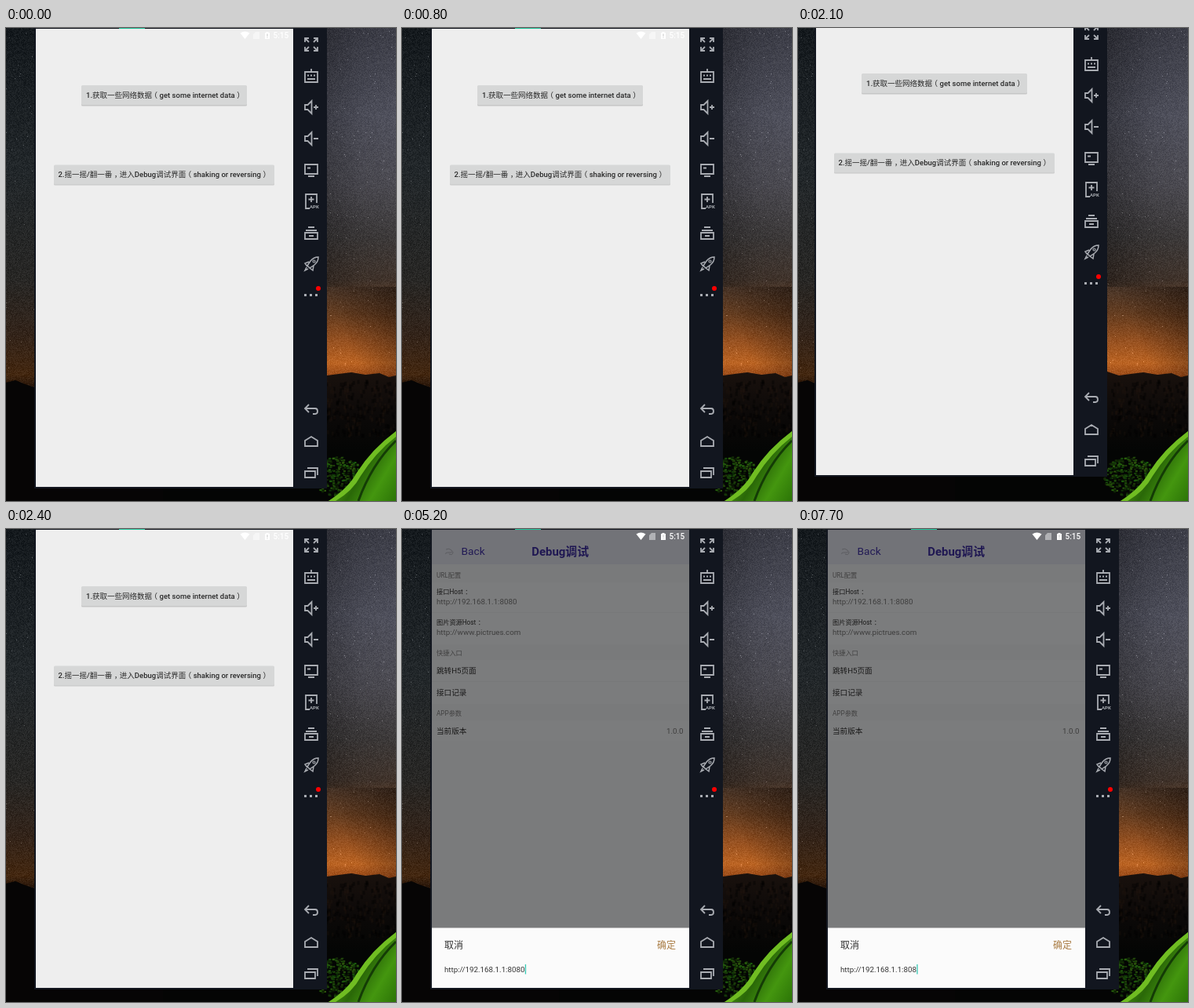
Write an HTML page with a canvas that moves like this. It is 497x603 px and loops after 8 s.

```html
<!DOCTYPE html>
<html lang="zh-CN">
<head>
<meta charset="utf-8">
<style>
html, body { margin: 0; width: 497px; height: 603px; overflow: hidden; background: #050505; }
canvas, svg { position: absolute; left: 0; top: 0; }
text { font-family: Roboto, "Noto Sans CJK SC", "Noto Sans CJK", sans-serif; font-size: 9.6px; fill: #333; }
.btn { font-size: 9.5px; font-weight: 500; fill: #2a2a2a; }
.sec { font-size: 8.2px; fill: #808080; }
.lab { font-size: 8.2px; }
.val, #url { font-size: 9.75px; }
.val { fill: #7a7a7a; }
.icons { fill: none; stroke: #a9acb2; stroke-width: 1.8; }
.solid { fill: #a9acb2; stroke: none; }
</style>
</head>
<body>
<canvas id="sky" width="497" height="603"></canvas>
<svg width="497" height="603">
  <g id="win">
    <rect x="36" width="373" height="587" fill="#12161f"/>
    <rect x="144" width="33" height="1" fill="#1fc49a"/>

    <g id="home">
      <rect x="38" y="1" width="328" height="584" fill="#eee"/>
      <g fill="#000" opacity=".16">
        <rect x="96" y="74" width="211" height="25.5" rx="1.5"/>
        <rect x="61" y="175.5" width="281" height="25" rx="1.5"/>
      </g>
      <g fill="#d6d7d7">
        <rect x="96" y="73" width="211" height="25" rx="1.5"/>
        <rect x="61" y="174.5" width="281" height="25" rx="1.5"/>
      </g>
      <!-- dx centres the full-width punctuation in its cell -->
      <text class="btn" x="102" y="89">1.获取一些网络数据<tspan dx="-2.5">（</tspan><tspan dx="2.5">get some internet data</tspan><tspan dx="2.5">）</tspan></text>
      <text class="btn" x="66.5" y="190.3">2.摇一摇/翻一番<tspan dx="2.5">，</tspan><tspan dx="-2.5">进入Debug调试界面</tspan><tspan dx="-2.5">（</tspan><tspan dx="2.5">shaking or reversing</tspan><tspan dx="2.5">）</tspan></text>
    </g>

    <g id="debug">
      <rect x="38" y="1" width="328" height="584" fill="#f5f7fa"/>
      <rect x="38" y="1" width="328" height="44" fill="#e6e8f1"/>
      <path fill="#f8f9fb" d="M38 68h328v79h-328zM38 167h328v56h-328zM38 244h328v26h-328z"/>
      <path fill="#f4f5f7" d="M38 45h328v23h-328zM38 147h328v20h-328zM38 223h328v21h-328z"/>
      <path fill="none" stroke="#f0f1f3" d="M38 106.5h328M38 194.5h328"/>
      <path fill="none" stroke="#b9bac4" d="M56 26q4-2 7 1t-3 3-4 2M60 32q5 2 5-3"/>
      <text x="75.5" y="33.3" style="font-size:13.7px;fill:#4434ab">Back</text>
      <text x="201.7" y="33.8" text-anchor="middle" style="font-size:14.9px;font-weight:700;fill:#3f2fa6">Debug调试</text>
      <text class="sec" x="44" y="61.5">URL配置</text>
      <text class="lab" x="44" y="83">接口Host<tspan dx="2.5">：</tspan></text>
      <text class="val" x="44" y="96">http://192.168.1.1:8080</text>
      <text class="lab" x="44" y="122">图片资源Host<tspan dx="2.5">：</tspan></text>
      <text class="val" x="44" y="135">http://www.pictrues.com</text>
      <text class="sec" x="44" y="161">快捷入口</text>
      <text x="44" y="184">跳转H5页面</text>
      <text x="44" y="212">接口记录</text>
      <text class="sec" x="44" y="237.5">APP参数</text>
      <text x="44" y="261">当前版本</text>
      <text class="val" x="358.5" y="261" text-anchor="end">1.0.0</text>
    </g>

    <g id="dialog">
      <rect x="38" y="1" width="328" height="508" opacity=".5"/>
      <rect x="38" y="508.5" width="328" height="76.5" fill="#fbfbfb"/>
      <text x="54" y="535" style="font-size:12px">取消</text>
      <text x="325" y="535" style="font-size:12px;fill:#a97b42">确定</text>
      <text id="url" x="54" y="565"></text>
      <rect id="caret" y="555" width="1.3" height="12.5" fill="#35c9b4"/>
    </g>

    <g fill="#fff">
      <path d="M298.500 6.500q6-4 12 0l-6 7.500z"/>
      <path opacity=".45" d="M315 8l3-3h5v9h-8zM315 5l8 9"/>
      <path d="M330 6h1.500v-1h3v1h1.500v8h-6z"/>
      <path fill="#888" opacity=".5" d="M332.500 7.500h1v3h-1zM332.500 11.500h1v1h-1z"/>
      <text x="340.500" y="13" style="font-size:10px;font-weight:500;fill:#fff">5:15</text>
    </g>

    <g class="icons">
      <path d="M381 18v-5h5M392 13h5v5M397 24v5h-5M386 29h-5v-5M382 14l4 4M396 14l-4 4M396 28l-4-4M382 28l4-4"/>
      <path d="M381 56h16v13h-16zM389 56v-4M384 60.500h2M388 60.500h2M392 60.500h2M384 65h10"/>
      <path d="M381 98h3.500l5-5v16l-5-5h-3.500zM392 101h6M395 98v6"/>
      <path d="M381 138h3.500l5-5v16l-5-5h-3.500zM392 141h6"/>
      <path d="M381 174h16v12h-16zM385 189h8M384 178.500h4"/>
      <path d="M387 230h-5v-18h14v11M389 215v7M385.500 218.500h7"/>
      <text x="387" y="230" style="font-size:6px;font-weight:700;fill:#a9acb2;stroke:none">APK</text>
      <path d="M381 261h16v8h-16zM382 258h14M385 254h8M386 265h6"/>
      <path stroke-width="1.500" d="M384 303l4-6q4-5 10-5 0 6-5 10l-6 4zM386 298l-5 2 3 4M392 303l-1 6-4-3M383 305l-2 4 4-2"/>
      <circle cx="392.500" cy="297.500" r="1.500" stroke-width="1.200"/>
      <path class="solid" d="M380 339h3v3h-3zM387 339h3v3h-3zM394 339h3v3h-3z"/>
      <circle cx="398" cy="332" r="3" fill="#f00" stroke="none"/>
      <path d="M386 480l-5 5 5 5M381 485h13q3 0 3 3.500t-3 3.500h-3"/>
      <path d="M381 533v-7l8-5 8 5v7z"/>
      <path d="M381 565h13v8h-13zM384 561h13v9"/>
    </g>
  </g>
</svg>
<script>
const $ = id => document.getElementById(id);
let seed = 7;
const rnd = () => (seed = (seed * 16807) % 2147483647) / 2147483647;
const ctx = $('sky').getContext('2d');

function gradient(x0, y0, x1, y1, colors) {
  const g = ctx.createLinearGradient(x0, y0, x1, y1);
  colors.forEach(([at, color]) => g.addColorStop(at, color));
  return g;
}

function fillPath(d, fill) {
  ctx.fillStyle = fill;
  ctx.fill(new Path2D(d));
}

function paintSky() {
  ctx.fillStyle = gradient(0, 0, 0, 460, [[0, '#14191d'], [.4, '#22272a'], [.7, '#282725'], [.85, '#33241a'], [.96, '#432710'], [1, '#24140a']]);
  ctx.fillRect(0, 0, 200, 470);
  ctx.fillStyle = gradient(0, 0, 0, 445, [[0, '#3c3d47'], [.25, '#50515d'], [.45, '#4c4b52'], [.6, '#3d3a3a'], [.72, '#41342c'], [.82, '#653d20'], [.9, '#985221'], [.96, '#bb6423'], [1, '#964818']]);
  ctx.fillRect(200, 0, 297, 450);
  ctx.fillStyle = gradient(390, 0, 497, 0, [[0, '#0005'], [.6, '#0001'], [1, '#0000']]);
  ctx.fillRect(200, 0, 297, 330);
  // Glow fades towards the right
  ctx.fillStyle = gradient(430, 390, 515, 350, [[0, '#1a100a00'], [1, '#1a100a99']]);
  ctx.fillRect(200, 330, 297, 120);

  // Grain and stars
  const img = ctx.getImageData(0, 0, 497, 460), px = img.data;
  for (let i = 0; i < px.length; i += 4) {
    const n = (rnd() - .5) * 22 + (rnd() < .002 ? 60 : 0);
    for (let c = 0; c < 3; c++) px[i + c] += n;
  }
  ctx.putImageData(img, 0, 0);
}

function paintGround() {
  fillPath('M0 452L12 449 24 454 36 458 200 460V603H0z', '#060505');
  fillPath('M200 445L394 438 409 443 424 441 440 439 458 442 476 440 488 445 497 443V603H200z',
    gradient(0, 440, 0, 540, [[0, '#19110d'], [.5, '#0c0908'], [1, '#040504']]));
  for (let i = 0; i < 260; i++) {
    ctx.fillStyle = rnd() < .5 ? '#2c1b1233' : '#00000066';
    ctx.fillRect(394 + rnd() * 103, 448 + rnd() * 70, 3, 5);
  }
  // Bush
  for (let i = 0; i < 380; i++) {
    const a = rnd() * 6.283, r = Math.sqrt(rnd());
    ctx.fillStyle = `hsl(${92 + rnd() * 20} 75% ${4 + rnd() * 18}%)`;
    ctx.fillRect(422 + Math.cos(a) * r * 34, 571 + Math.sin(a) * r * 25, 3, 2);
  }
  // Tent
  const edge = 'M497 514Q466 537 447 567 436 587 411 603';
  fillPath(edge + 'H497z', gradient(425, 560, 497, 603, [[0, '#4f9d12'], [.35, '#2a6808'], [.65, '#44960f'], [1, '#2c7507']]));
  fillPath(edge + 'H420Q442 590 452 571 471 541 497 521z', '#70bd22');
  ctx.lineWidth = 3;
  ctx.strokeStyle = '#143c06';
  ctx.stroke(new Path2D('M497 526Q466 556 449 603'));
}

paintSky();
paintGround();

const LOOP = 8000;
const BLINKS = [5600, 6000, 6500, 6900, 7400, 7700];
const SHAKES = [[500, 800, -15, -15], [1400, 1500, 0, -15], [2100, 2400, -15, -15]];
const show = (id, opacity) => $(id).setAttribute('opacity', opacity);

function render(t) {
  const [, , dx, dy] = SHAKES.find(([from, to]) => t >= from && t < to) || [0, 0, 0, 0];
  $('win').setAttribute('transform', `translate(${dx} ${dy})`);
  show('debug', t < 2500 ? 0 : t < 2600 ? .6 : 1);
  show('dialog', t < 5200 ? 0 : 1);
  const erased = t >= 7700;
  $('url').textContent = 'http://192.168.1.1:808' + (erased ? '' : '0');
  $('caret').setAttribute('x', erased ? 151.3 : 156.8);
  show('caret', BLINKS.filter(b => t >= b).length % 2 ? 0 : 1);
}

const start = performance.now();
function tick() {
  render((performance.now() - start) % LOOP);
  requestAnimationFrame(tick);
}
tick();
</script>
</body>
</html>
```
